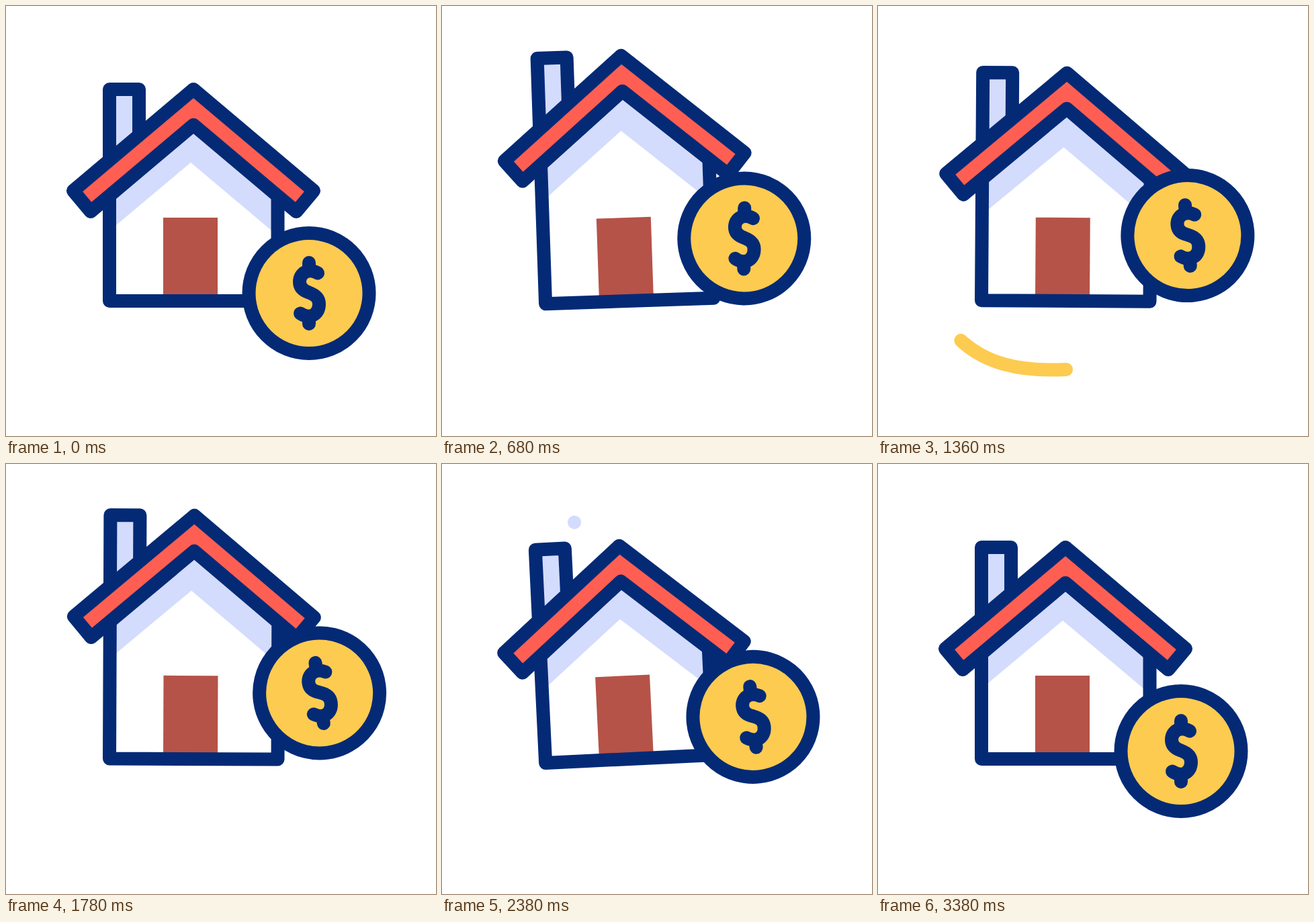
Recreate the animation shown at these times as an HTML page. Size 640x640 px, loop 3.56 s.

```html
<!DOCTYPE html>
<html lang="en">
<head>
<meta charset="utf-8">
<title>House and coin</title>
<style>
  html, body { margin: 0; width: 100%; height: 100%; overflow: hidden; background: #fff; }
  svg { display: block; width: 100vw; height: 100vh; }
  .line { stroke: #042a76; stroke-width: 20; stroke-linecap: round; stroke-linejoin: round; fill: none; }
  .trail { fill: none; stroke-width: 20; stroke-linecap: round; }
  .pale { fill: #d3dcfd; }
  .red { fill: #ff5f52; }
  .gold { fill: #fdcb50; }
</style>
</head>
<body>
<svg viewBox="0 0 640 640">
  <path id="swoosh" class="trail" stroke="#fdcb50" pathLength="1"
    d="M77 402C80 440 102 480 128 502C160 529 205 545 280 541"/>
  <path id="smoke" class="trail" stroke="#d3dcfd" pathLength="1"
    d="M197 87C197 58 155 54 155 24"/>
  <g id="house">
    <path id="gable" class="pale"/>
    <path id="front" fill="#fff"/>
    <rect x="234" y="315" width="81" height="120" fill="#b55348"/>
    <path id="walls" class="line"/>
    <g id="top">
      <path class="line pale" d="M154 241V124H198V204"/>
      <path class="line red" d="M279 124L458 275L432 306L279 177L126 306L100 275Z"/>
    </g>
  </g>
  <g id="coin">
    <circle class="line gold" r="89.5"/>
    <path class="line" d="M0 -45.5V-34M13 -30C-1 -38 -14 -30 -14 -17C-14 -7 -6 -3 0 -1C8 2 15 6 15 16C15 33 0 39 -13 30M0 36V45.5"/>
  </g>
</svg>
<script>
  const LOOP = 3560;
  const el = id => document.getElementById(id);

  // Sine ease from 0 to 1 between two times.
  function ease(t, from, to) {
    const p = Math.min(Math.max((t - from) / (to - from), 0), 1);
    return 0.5 - 0.5 * Math.cos(Math.PI * p);
  }

  // Leaves rest, swings between a and b with a turn every `half` ms, returns to rest.
  function swing(t, { start, first, half, turns, end, a, b }) {
    const last = first + half * turns;
    const phase = (Math.min(Math.max(t, first), last) - first) / half;
    const value = a + (b - a) * (0.5 - 0.5 * Math.cos(Math.PI * phase));
    return value * ease(t, start, first) * (1 - ease(t, last, end));
  }

  const LIFT = { start: 200, first: 715, half: 605, turns: 2, end: 2460, a: 51, b: 24 };
  const TILT = { start: 440, first: 930, half: 635, turns: 2, end: 2680, a: -4, b: 1.7 };
  const SPIN = { start: 600, first: 915, half: 316, turns: 5, end: 2940, a: 4, b: -10 };
  const FLOAT = { start: 220, first: 755, half: 1405, turns: 1, end: 2660, a: 85.5, b: 85.5 };
  const SWING_ARM = 115; // the coin hangs from a pivot this far above its centre

  function trail(id, head, tail) {
    const path = el(id);
    path.style.visibility = head > 0 && tail < 1 ? 'visible' : 'hidden';
    path.setAttribute('stroke-dasharray', `${Math.max(head - tail, 0.001)} 3`);
    path.setAttribute('stroke-dashoffset', -tail);
  }

  function draw(t) {
    const lift = swing(t, LIFT);
    const eaves = 283 - lift;
    const drop = -0.94 * lift; // the shadow rises a little less than the roof
    el('house').setAttribute('transform', `rotate(${swing(t, TILT)} 279 439)`);
    el('top').setAttribute('transform', `translate(0 ${-lift})`);
    el('gable').setAttribute('d', `M154 439V${eaves}L279 ${eaves - 106}L404.5 ${eaves}V439Z`);
    el('front').setAttribute('d', `M154 439V${334.5 + drop}L275 ${233 + drop}L404.5 ${342 + drop}V439Z`);
    el('walls').setAttribute('d', `M154 ${eaves}V439H404.5V${eaves}`);
    el('coin').setAttribute('transform',
      `translate(451 ${427.5 - swing(t, FLOAT)}) rotate(${swing(t, SPIN)} 0 ${-SWING_ARM})`);
    trail('swoosh', ease(t, 860, 1080), ease(t, 1266, 1486));
    trail('smoke', ease(t, 2365, 2800), ease(t, 2890, 3378));
  }

  const start = performance.now();
  function tick() {
    draw((performance.now() - start) % LOOP);
    requestAnimationFrame(tick);
  }
  tick();
</script>
</body>
</html>
```
